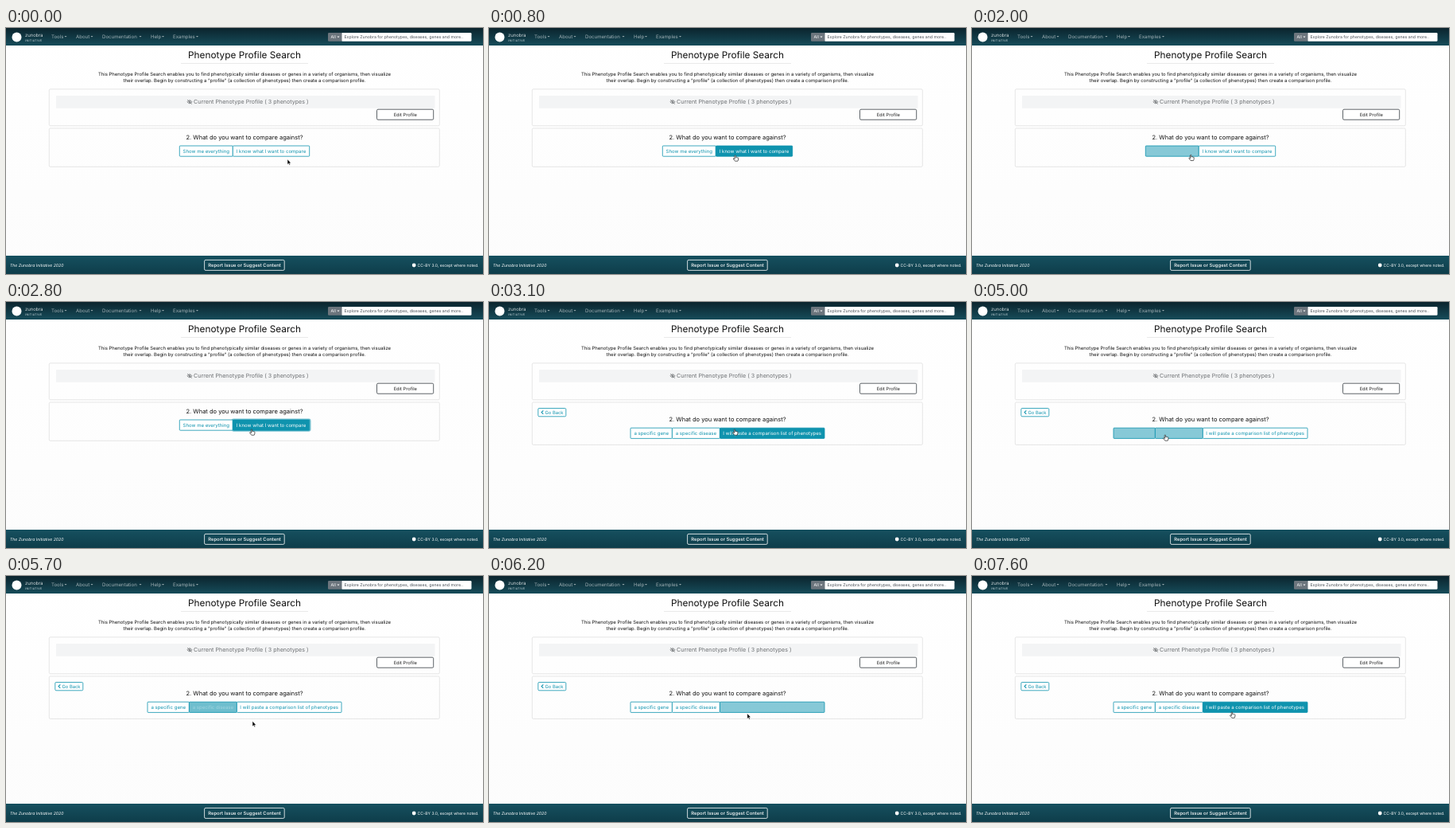
An HTML page for the animation above (8000 ms loop, 600x309 px).

```html
<!DOCTYPE html>
<html lang="en">
<head>
<meta charset="utf-8">
<title>Phenotype Profile Search</title>
<style>
  html, body { margin: 0; width: 100%; height: 100%; overflow: hidden; background: #fff; }
  svg { display: block; width: 100vw; height: 100vh; }
  text { font-family: Inter, "Open Sans", sans-serif; text-rendering: geometricPrecision; }
</style>
</head>
<body>
<svg id="stage" viewBox="0 0 600 309" preserveAspectRatio="none">
  <defs>
    <linearGradient id="navFill" x2="0" y2="1">
      <stop stop-color="#0b242d"/><stop offset="1" stop-color="#164c5a"/>
    </linearGradient>
    <linearGradient id="footFill" x2="0" y2="1">
      <stop stop-color="#16505f"/><stop offset="1" stop-color="#0e3d4a"/>
    </linearGradient>
    <linearGradient id="pageFill" x2="0" y2="1">
      <stop stop-color="#fff"/><stop offset="1" stop-color="#fcfcfc"/>
    </linearGradient>
  </defs>
  <rect width="600" height="309" fill="url(#pageFill)"/>
  <g id="page"></g>
  <g id="startView"></g>
  <g id="chooseView"></g>
  <g id="cursor" stroke-linejoin="round" stroke-linecap="round">
    <path id="arrow" d="M0 0V6.4L1.5 5.1L2.5 7.3L3.5 6.8L2.6 4.7H4.5Z" fill="#000" stroke="#fff" stroke-width=".5"/>
    <path id="hand" d="M-.7 .3Q0-.5 .6 .3V2.6Q1.2 2 1.8 2.7Q2.4 2.2 2.9 2.9Q3.7 2.5 3.9 3.4V5Q3.8 6 3.2 7.2H-.2Q-1.6 5.6-2.5 4Q-2.1 3.1-.7 4.2Z" fill="#fff" stroke="#111" stroke-width=".65"/>
  </g>
</svg>
<script>
const LOOP = 8000, STEP = 100;
const TEAL = [15, 147, 174], WHITE = [255, 255, 255];
const teal = `rgb(${TEAL})`;
const $ = id => document.getElementById(id);

function add(parent, tag, attrs, content) {
  const node = document.createElementNS("http://www.w3.org/2000/svg", tag);
  for (const key in attrs) node.setAttribute(key, attrs[key]);
  if (content) node.textContent = content;
  parent.append(node);
  return node;
}
const box = (parent, x, y, width, height, attrs) =>
  add(parent, "rect", { x, y, width, height, fill: "none", ...attrs });
const label = (parent, text, x, y, size, fill, attrs) =>
  add(parent, "text", { x, y, "font-size": size, fill, ...attrs }, text);
const middle = { "text-anchor": "middle" };
const caret = (x, y, fill) => add(page, "path", { d: `M${x} ${y}h3l-1.5 1.6z`, fill });

const page = $("page"), startView = $("startView"), chooseView = $("chooseView");

function drawHeader() {
  const dim = "rgba(255,255,255,.6)";
  box(page, 0, 0, 600, 22, { fill: "url(#navFill)" });
  add(page, "circle", { cx: 13.5, cy: 11.5, r: 6, fill: "#fff" });
  label(page, "zunobra", 24, 11.2, 5.9, "#fff", { "font-weight": 300 });
  label(page, "INITIATIVE", 24.3, 16.6, 3.5, "#dce7ea", { "letter-spacing": .35 });
  [["Tools", 57, 73.5], ["About", 88, 106.5], ["Documentation", 121, 167.5],
   ["Help", 182, 196], ["Examples", 210, 239]].forEach(([name, x, end]) => {
    label(page, name, x, 13, 6.1, dim);
    caret(end, 10, dim);
  });
  box(page, 422, 6, 163.5, 10.8, { fill: "#fff", rx: 1.3 });
  box(page, 405, 6, 17.5, 10.8, { fill: "#6c757d", rx: 1.3 });
  label(page, "All", 408.5, 13.2, 5.3, "#fff");
  caret(416.5, 10.6, "#fff");
  label(page, "Explore Zunobra for phenotypes, diseases, genes and more..", 425.5, 13.2, 5.2, "#495057");
}

function drawBody() {
  label(page, "Phenotype Profile Search", 300, 38.2, 11.8, "#111", middle);
  box(page, 220, 44.2, 160, .6, { fill: "#ddd" });
  label(page, "This Phenotype Profile Search enables you to find phenotypically similar diseases or genes in a variety of organisms, then visualize",
    300, 60, 5.95, "#111", middle);
  label(page, "their overlap. Begin by constructing a \"profile\" (a collection of phenotypes) then create a comparison profile.",
    300, 68.3, 5.95, "#111", middle);
  box(page, 54.3, 76.8, 491, 46, { stroke: "#dcdcdc", "stroke-width": .7, rx: 1.5 });
  box(page, 63, 85, 476.5, 15.8, { fill: "#f3f4f5" });
  label(page, "Current Phenotype Profile ( 3 phenotypes )", 308.3, 95.3, 7.1, "#6c6f72", middle);
  add(page, "path", {
    d: "M228 92.8Q231 88.8 234 92.8Q231 96.8 228 92.8M230 92.8a1 1 0 1 0 2 0a1 1 0 1 0-2 0M228.2 90.2L233.8 95.6",
    fill: "none", stroke: "#6c6f72", "stroke-width": .8
  });
  box(page, 466.5, 102.2, 71.2, 13, { fill: "#fff", stroke: "#343a40", "stroke-width": .8, rx: 1.5 });
  label(page, "Edit Profile", 502.3, 110.8, 5.75, "#222", middle);
}

function drawFooter() {
  box(page, 0, 286, 600, 23, { fill: "url(#footFill)" });
  label(page, "The Zunobra Initiative 2020", 5, 300, 5.15, "#fff", { "font-style": "italic" });
  box(page, 249.6, 291.4, 100.6, 13, { stroke: "#fff", "stroke-width": .8, rx: 1.5 });
  label(page, "Report Issue or Suggest Content", 300, 300, 5.9, "#fff", { ...middle, "font-weight": 500 });
  add(page, "circle", { cx: 513.2, cy: 298, r: 2.4, fill: "#fff" });
  label(page, "CC-BY 3.0, except where noted.", 594.5, 300, 5.05, "#fff", { "text-anchor": "end" });
}

function panel(view, height, questionY) {
  box(view, 54.3, 126, 491, height, { stroke: "#dcdcdc", "stroke-width": .7, rx: 1.5 });
  label(view, "2. What do you want to compare against?", 300, questionY, 7.5, "#111", middle);
}

// track: [time, fill level] pairs
function option(view, text, left, right, y, track) {
  const rect = box(view, left, y, right - left, 13.2, { stroke: teal, "stroke-width": .8, rx: .8 });
  const name = label(view, text, (left + right) / 2, y + 8.7, 6.05, teal, middle);
  return { rect, name, track };
}

drawHeader();
drawBody();
drawFooter();

panel(startView, 48.3, 140.3);
const ring = box(startView, 284.6, 147.4, 98, 14.4, { stroke: teal, "stroke-opacity": .55, "stroke-width": 1.8, rx: 1.5 });
panel(chooseView, 53.4, 150.4);
box(chooseView, 61.8, 133.5, 35, 10.3, { fill: "#fff", stroke: teal, "stroke-width": .8, rx: 1.3 });
add(chooseView, "path", { d: "M68.3 136.4L66.1 138.6L68.3 140.8", fill: "none", stroke: teal, "stroke-width": 1.1 });
label(chooseView, "Go Back", 70.4, 140.7, 5.85, teal);

const options = [
  option(startView, "Show me everything", 218.3, 285.3, 148,
    [[1100, 0], [1300, 1], [1900, 1], [2100, 0]]),
  option(startView, "I know what I want to compare", 285.3, 381.7, 148,
    [[500, 0], [700, 1], [1000, 1], [1200, 0], [2000, 0], [2200, 1]]),
  option(chooseView, "a specific gene", 178, 230.4, 158.2,
    [[4100, 0], [4200, .15], [4300, 1], [4900, 1], [5100, 0]]),
  option(chooseView, "a specific disease", 230.4, 290.4, 158.2,
    [[4900, 0], [5100, 1], [5600, 1], [5700, .6], [5800, 0]]),
  option(chooseView, "I will paste a comparison list of phenotypes", 290.4, 422, 158.2,
    [[2800, 0], [3000, 1], [3800, 1], [4000, 0], [6100, 0], [6300, 1]])
];

// time, x, y
const path = [
  [100, 354, 165], [700, 312, 161], [800, 309.7, 160], [900, 309.7, 160],
  [1300, 257, 159], [1800, 257, 159], [2300, 309, 160], [3700, 309, 160],
  [4200, 206, 169.7], [4600, 208, 167], [4700, 208, 167], [5200, 262, 167],
  [5500, 272, 169], [5700, 310, 182.5], [6000, 330, 181], [6300, 323, 170],
  [6500, 322, 168], [7100, 322, 168], [7400, 327, 171]
];

function sample(track, time) {
  const next = track.findIndex(key => key[0] >= time);
  if (next < 0) return track[track.length - 1].slice(1);
  if (next === 0) return track[0].slice(1);
  const from = track[next - 1], to = track[next];
  const p = (time - from[0]) / (to[0] - from[0]);
  const eased = p * p * (3 - 2 * p);
  return from.slice(1).map((value, i) => value + (to[i + 1] - value) * eased);
}
const mix = (a, b, k) => `rgb(${a.map((value, i) => Math.round(value + (b[i] - value) * k))})`;
const show = (node, visible) => node.setAttribute("visibility", visible ? "visible" : "hidden");

function render(time) {
  const choosing = time >= 2900;
  startView.style.display = choosing ? "none" : "";
  chooseView.style.display = choosing ? "" : "none";
  show(ring, time >= 2800 && !choosing);
  for (const { rect, name, track } of options) {
    const [level] = sample(track, time);
    rect.setAttribute("fill", mix(WHITE, TEAL, level));
    name.setAttribute("fill", mix(TEAL, WHITE, level));
  }
  const [x, y] = sample(path, time);
  $("cursor").setAttribute("transform", `translate(${x} ${y})`);
  const [left, right, bottom] = choosing ? [178, 422, 172] : [218, 382, 161.5];
  const over = x > left && x < right && y < bottom;
  show($("hand"), over);
  show($("arrow"), !over);
}

const begin = performance.now();
function tick() {
  const elapsed = (performance.now() - begin) % LOOP;
  render(Math.floor(elapsed / STEP) * STEP);
  requestAnimationFrame(tick);
}
tick();
</script>
</body>
</html>
```
